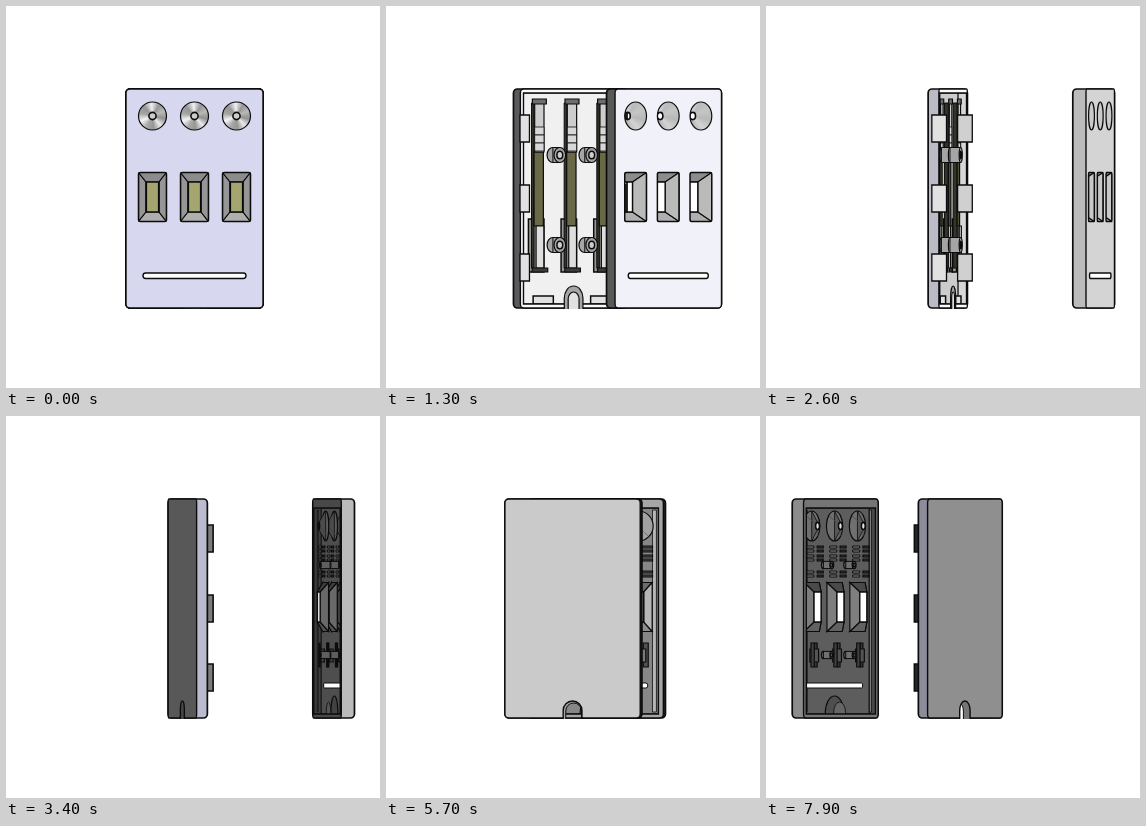
Recreate the animation shown at these times as an HTML page with a canvas. Size 374 px wide and 382 px high, loop 8000 ms.

```html
<!DOCTYPE html>
<html lang="en">
<head>
<meta charset="utf-8">
<title>Rotating enclosure</title>
<style>
html, body { margin: 0; width: 100%; height: 100%; overflow: hidden; background: #fff; }
canvas { display: block; }
</style>
</head>
<body>
<canvas id="stage" width="374" height="382"></canvas>
<script>
const stage = document.getElementById('stage').getContext('2d');
const layer = document.createElement('canvas');
layer.width = 374;
layer.height = 382;
const g = layer.getContext('2d');

// Orthographic model, turning about the vertical axis x = CX
const CX = 188.5, HW = 68.5, TOP = 83, BOTTOM = 302;
const BASE = { back: -12.4, front: -1.4 };
const COVER = { back: 135.5, front: 149, floor: 143, tip: 136 };
const COLS = [-42, 0, 42], SCREWS = [-20.5, 20.5];
const CLIPS = [[109, 136], [179, 206], [248, 275]];
const INK = '#0c0c0c';
let angle = 0, c = 1, s = 0;

const grey = v => `rgb(${v},${v},${v})`;
const px = (x, z) => CX + x * c + z * s;

function tone(keys, a = angle) {
  let i = 1;
  while (i < keys.length - 1 && a > keys[i][0]) i++;
  const [a0, v0] = keys[i - 1], [a1, v1] = keys[i];
  const k = Math.min(1, Math.max(0, (a - a0) / (a1 - a0)));
  return v0 + (v1 - v0) * k;
}

function paint(fill, line, width = 1.2) {
  if (fill) { g.fillStyle = fill; g.fill(); }
  if (line) { g.strokeStyle = line; g.lineWidth = width; g.stroke(); }
}

// Traces a path on the plane at depth z; the line width stays unscaled
function trace(z, build) {
  g.save();
  g.transform(c, 0, 0, 1, CX + z * s, 0);
  g.beginPath();
  build();
  g.restore();
}

function rect(z, x, y, w, h, fill, line = INK, width, r = 0) {
  trace(z, () => r ? g.roundRect(x, y, w, h, r) : g.rect(x, y, w, h));
  paint(fill, line, width);
}

function disc(z, x, y, r, fill, line = INK, width) {
  trace(z, () => g.arc(x, y, r, 0, 7));
  paint(fill, line, width);
}

function poly(pts, fill, line = INK, width) {
  g.beginPath();
  for (const [x, y, z] of pts) g.lineTo(px(x, z), y);
  g.closePath();
  paint(fill, line, width);
}

function wall(x, z0, z1, y0, y1, fill, width) {
  poly([[x, y0, z0], [x, y0, z1], [x, y1, z1], [x, y1, z0]], fill, INK, width);
}

function arch(z, w, y, fill, line = INK, width) {
  trace(z, () => {
    g.moveTo(-w, BOTTOM + 1);
    g.lineTo(-w, y + w);
    g.arc(0, y + w, w, Math.PI, 0);
    g.lineTo(w, BOTTOM + 1);
  });
  paint(fill, line, width);
}

function punch() {
  g.save();
  g.globalCompositeOperation = 'destination-out';
  g.fill();
  g.restore();
}

function hull(part, fill) {
  const xs = [px(-HW, part.back), px(HW, part.back), px(-HW, part.front), px(HW, part.front)];
  const x0 = Math.min(...xs), x1 = Math.max(...xs);
  g.beginPath();
  g.roundRect(x0, TOP, x1 - x0, BOTTOM - TOP, 4);
  paint(fill, INK, 1.7);
}

function face(z, fill) {
  const r = Math.min(4, 4 / Math.max(0.2, Math.abs(c)));
  rect(z, -HW, TOP, HW * 2, BOTTOM - TOP, fill, INK, 1.4, r);
}

function sideTone(blue = 0) {
  const v = 40 + 155 * Math.pow(Math.abs(s), 2.5);
  return `rgb(${v},${v},${v + blue * s * s})`;
}

// Four slopes from a large opening at z0 to a small one at z1
function funnel(x, z0, z1, tones) {
  const y = 191, lit = -Math.sign((z1 - z0) * s * c) || 1;
  const side = (k, fill) => poly([[x + k * 14, y - 24.5, z0], [x + k * 6.5, y - 15, z1],
    [x + k * 6.5, y + 15, z1], [x + k * 14, y + 24.5, z0]], fill);
  const cap = (k, fill) => poly([[x - 14, y + k * 24.5, z0], [x - 6.5, y + k * 15, z1],
    [x + 6.5, y + k * 15, z1], [x + 14, y + k * 24.5, z0]], fill);
  side(-lit, grey(tones[0]));
  cap(-1, grey(tones[1]));
  cap(1, grey(tones[2]));
  side(lit, grey(tones[3]));
  rect(z1, x - 6.5, y - 15, 13, 30, null, null);
  punch();
  paint(null, INK, 1.4);
}

function frontCone(x) {
  const y = 110, mid = px(x, COVER.tip);
  g.save();
  trace(COVER.front, () => g.arc(x, y, 14, 0, 7));
  g.clip();
  const sheen = g.createConicGradient(-0.4, mid, y);
  const steps = [185, 145, 235, 150, 170, 245, 165, 150, 240, 150, 185];
  const flat = Math.min(1, angle / 57);
  steps.forEach((v, i) => sheen.addColorStop(i / 10, grey(v + (202 - v) * flat)));
  g.fillStyle = sheen;
  g.fill();
  disc(COVER.tip, x, y, 3.6, null, null);
  punch();
  paint(null, INK, 1.6);
  g.restore();
  disc(COVER.front, x, y, 14, null, INK, 1.2);
}

function coverFront() {
  hull(COVER, sideTone());
  const v = tone([[0, 215], [24, 217], [45, 250], [60, 254], [75, 222], [90, 170]]);
  const blue = tone([[0, 24], [24, 22], [48, 0], [90, 0]]);
  face(COVER.front, `rgb(${v},${v},${Math.min(255, v + blue)})`);
  const right = tone([[0, 150], [24, 160], [57, 218], [90, 190]]);
  for (const x of COLS) {
    frontCone(x);
    g.save();
    trace(COVER.front, () => g.rect(x - 14, 166.5, 28, 49));
    g.clip();
    funnel(x, COVER.front, COVER.tip, [150, 140, 175, right]);
    g.restore();
    rect(COVER.front, x - 14, 166.5, 28, 49, null, INK, 1.5, 2);
  }
  rect(COVER.front, -51.5, 267, 103, 5.5, null, null, 0, 2.7);
  punch();
  paint(null, INK, 1.4);
}

function cylinder(x, y, r, z0, z1, fill) {
  disc(z0, x, y, r, fill);
  const a = px(x, z0), b = px(x, z1);
  g.beginPath();
  g.rect(Math.min(a, b), y - r, Math.abs(b - a), r * 2);
  paint(fill, INK, 1);
  disc(z1, x, y, r, fill);
  disc(z1, x, y, r * 0.5, grey(205), INK, 1.5);
}

function rearCone(x, v) {
  const y = 110, z0 = COVER.floor, z1 = COVER.tip;
  disc(z0, x, y, 15, grey(v));
  poly([[x, y - 15, z0], [x, y - 3.6, z1], [x, y + 3.6, z1], [x, y + 15, z0]], grey(v * 0.8), INK, 0.8);
  g.beginPath();
  g.moveTo(px(x, z1), y);
  g.lineTo(px(x + 10, z0), y - 10);
  g.moveTo(px(x, z1), y);
  g.lineTo(px(x - 10, z0), y + 10);
  paint(null, grey(v * 0.72), 1);
  disc(z1, x, y, 3.6, grey(225), INK, 1.6);
}

function coverRear(back) {
  hull(COVER, sideTone());
  face(COVER.back, grey(back * 0.82));
  const v = tone([[90, 70], [102, 78], [141, 118], [171, 135], [200, 130], [240, 90]]);
  const box = [-HW + 5, TOP + 9, HW * 2 - 10, BOTTOM - TOP - 13];
  g.save();
  trace(COVER.back, () => g.rect(...box));
  g.clip();
  g.fillStyle = grey(v * 0.8);
  g.fill();
  const z = COVER.floor;
  rect(z, ...box, grey(v), INK, 1);
  for (const k of [-1, 1]) rect(COVER.back + 3, k * 59 - 2, 94, 4, 202, grey(v * 1.35), INK, 0.8);
  for (const x of COLS) {
    rearCone(x, v * 1.2);
    for (const y of [130, 134, 139, 143, 155, 159]) {
      rect(z - 4, x - 15, y, 11, 2, grey(v * 0.55));
      rect(z - 4, x + 2, y, 13, 2, grey(v * 1.5), INK, 1);
    }
    funnel(x, z, COVER.tip, [v * 0.7, v * 0.8, v * 1.05, v * 1.35]);
    rect(z, x - 10, 227, 5, 24, grey(v * 0.6));
    rect(z - 3, x - 8, 233, 16, 13, grey(v * 0.9));
    rect(z - 5, x + 3, 227, 6, 24, grey(v * 0.7));
  }
  for (const x of SCREWS) for (const y of [149, 239]) cylinder(x, y, 3.6, z, z - 10, grey(v * 1.2));
  rect(z, -51.5, 267, 103, 5, null, null, 0, 2);
  punch();
  paint(null, INK, 1);
  arch(z, 17, 280, grey(v * 0.85));
  arch(z - 6, 11, 286, grey(v * 1.1), INK, 0.8);
  g.restore();
  rect(COVER.back, ...box, null, INK, 1.4);
}

function contact(x) {
  const o = tone([[0, 165], [21, 122], [57, 88], [90, 70]]);
  const olive = `rgb(${o},${o},${o * 0.68})`;
  rect(-9, x - 10, 213, 20, 53, grey(150), INK, 1.5);
  wall(x - 6, -9, -5, 97, 262, '#34342a', 1);
  rect(-5, x - 6, 146, 12, 74, olive);
  rect(-4, x - 6, 97, 12, 49, grey(205));
  for (const y of [121, 129, 137]) rect(-4, x - 6, y, 12, 8, grey(215), INK, 0.8);
  rect(-4, x - 9, 93, 18, 5, grey(110));
  rect(-3, x - 5, 220, 10, 42, grey(222));
  rect(-3, x - 10, 262, 20, 4, grey(60));
}

function clips(x, fill, width) {
  for (const [y0, y1] of CLIPS) wall(x, -10, 5, y0, y1, fill, width);
}

function baseFront() {
  hull(BASE, sideTone(14));
  face(BASE.front, grey(250));
  const box = [-HW + 4, TOP + 4, HW * 2 - 8, BOTTOM - TOP - 8];
  g.save();
  trace(BASE.front, () => g.rect(...box));
  g.clip();
  rect(-10, ...box, grey(tone([[0, 253], [25, 250], [57, 228], [90, 190]])), INK, 1);
  wall(HW - 4, -10, BASE.front, TOP + 4, BOTTOM - 4, grey(215), 1);
  COLS.forEach(contact);
  for (const x of SCREWS) for (const y of [149, 239]) cylinder(x, y, 7.5, -9, 2, grey(165));
  for (const x of [-50, 24]) rect(-4, x, 290, 26, 8, grey(225), INK, 1.5);
  g.restore();
  rect(BASE.front, ...box, null, INK, 1.4);
  clips(-62, grey(225), 1.3);
  clips(62, grey(208), 1.3);
  arch(BASE.front, 12, 280, grey(165));
  arch(BASE.front, 7, 286, grey(225));
}

function baseRear(back) {
  const dark = grey(s > 0 ? 125 : 40);
  clips(-66, dark, 1.6);
  clips(66, dark, 1.6);
  hull(BASE, sideTone(22));
  face(BASE.back, grey(back));
  g.save();
  arch(BASE.back, 9.5, 285, grey(back * 0.82), null);
  g.clip();
  arch(BASE.back + 7, 8, 287, null, null);
  punch();
  paint(null, INK, 1);
  g.restore();
  arch(BASE.back, 9.5, 285, null, INK, 1.4);
}

function show(draw, arg) {
  g.clearRect(0, 0, 374, 382);
  draw(arg);
  stage.drawImage(layer, 0, 0);
}

function frame(now) {
  angle = Math.floor((now % 8000) / 100) * 3;
  const a = angle * Math.PI / 180;
  c = Math.cos(a);
  s = Math.sin(a);
  if (Math.abs(c) < 0.002) c = 0.002;
  stage.fillStyle = '#fff';
  stage.fillRect(0, 0, 374, 382);
  if (c > 0) {
    show(baseFront);
    show(coverFront);
  } else {
    const back = tone([[90, 78], [102, 88], [141, 158], [171, 202], [190, 205], [237, 143], [240, 140]]);
    show(coverRear, back);
    show(baseRear, back);
  }
}

const start = performance.now();
function tick() {
  frame(Math.max(0, performance.now() - start));
  requestAnimationFrame(tick);
}
tick();
</script>
</body>
</html>
```
